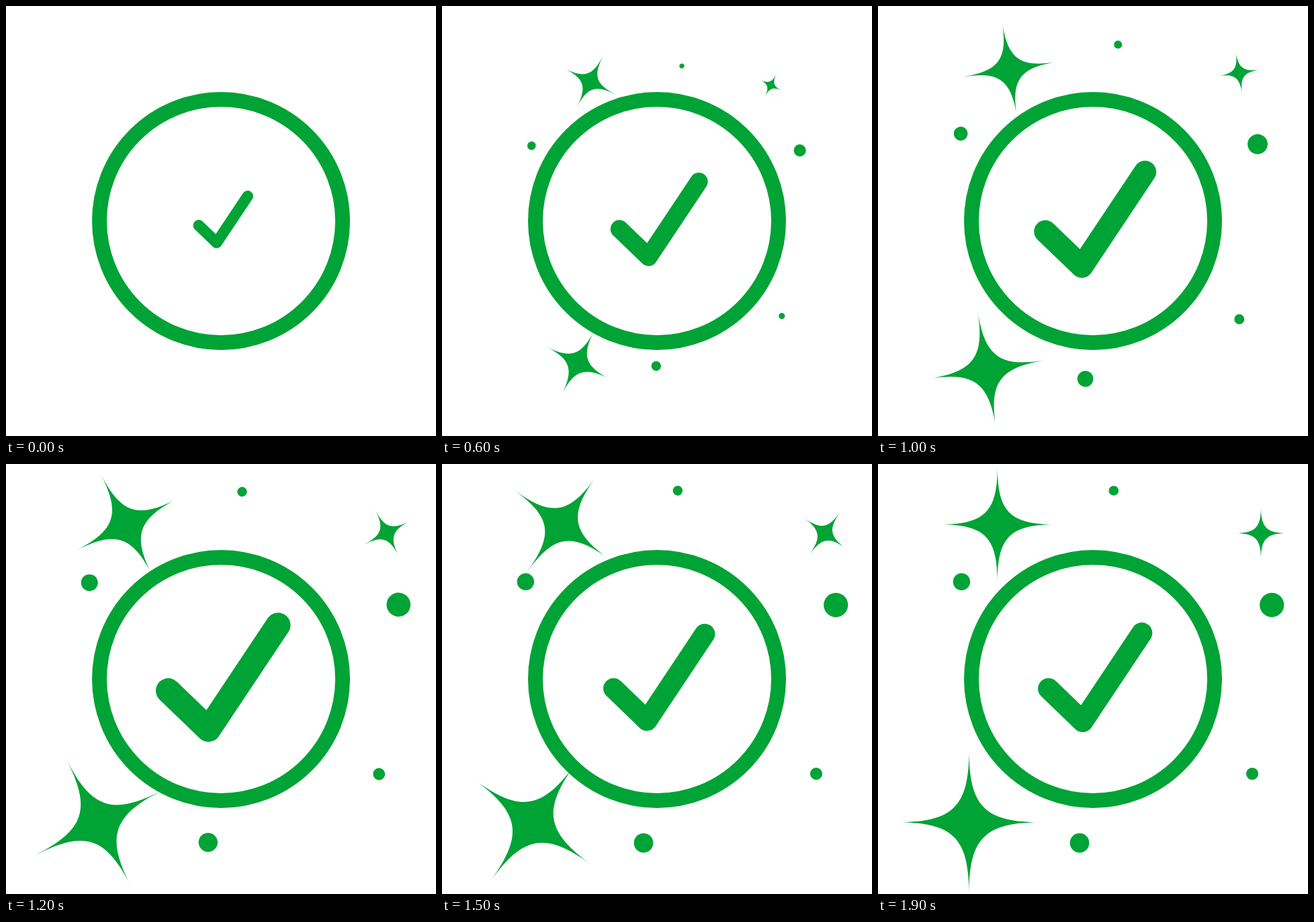
Write an HTML page with a canvas that moves like this. It is 640 px wide and 640 px high and loops after 2200 ms.

```html
<!DOCTYPE html>
<html lang="en">
<head>
<meta charset="utf-8">
<title>Success check</title>
<style>
  html, body { margin: 0; width: 100%; height: 100%; overflow: hidden; background: #fff; }
  canvas { display: block; }
</style>
</head>
<body>
<canvas id="stage" width="640" height="640"></canvas>
<script>
const ctx = document.getElementById('stage').getContext('2d');
const LOOP = 2200, STEP = 100, LAST = 1900, PEAK = 1200;
const GREEN = '#00a335';
const CENTER = 320, RING = 181;

// Particles leave the ring at an angle (degrees) and bow sideways on the way to x, y.
const PARTICLES = [
  { shape: star, size: 107, angle: 110, bend: 0.196, x: 135.5, y: 533.3 },
  { shape: star, size: 86, angle: -112, bend: -0.133, x: 177.8, y: 90 },
  { shape: star, size: 39, angle: -55, bend: 0.169, x: 570, y: 103 },
  { shape: dot, size: 7.3, angle: -82, bend: -0.12, x: 350.8, y: 39.7 },
  { shape: dot, size: 18.1, angle: -24, bend: 0.17, x: 586.2, y: 209.8 },
  { shape: dot, size: 12.7, angle: -150, bend: 0.233, x: 124.4, y: 175.3 },
  { shape: dot, size: 14.4, angle: 87, bend: 0.087, x: 300, y: 564 },
  { shape: dot, size: 9.1, angle: 41, bend: -0.143, x: 557, y: 461 }
];

// Sideways drift: grows steadily until two thirds of the way, then falls back.
function bow(p) {
  return p < 2 / 3 ? 1.5 * p : 1 - (3 * p - 2) ** 1.3;
}

function flight({ angle, bend, x, y }, p) {
  const a = angle * Math.PI / 180;
  const x0 = CENTER + (RING + 3) * Math.cos(a), y0 = CENTER + (RING + 3) * Math.sin(a);
  const dx = x - x0, dy = y - y0, side = bend * bow(p);
  return [x0 + dx * p + dy * side, y0 + dy * p - dx * side];
}

// Steady growth past full size, then a damped swing back to it.
function checkScale(t) {
  const start = 0.525, overshoot = 0.178;
  if (t < PEAK) return start + (1 + overshoot - start) * t / PEAK;
  const u = t - PEAK, decay = (1 - u / (LAST - PEAK)) ** 1.6;
  return 1 + overshoot * decay * Math.cos(Math.PI * u / 500);
}

function place([x, y], scale, angle, paint) {
  ctx.save();
  ctx.translate(x, y);
  ctx.rotate(angle);
  ctx.scale(scale, scale);
  ctx.beginPath();
  paint();
  ctx.restore();
}

function star() {
  const pinch = 0.22;
  ctx.moveTo(0, -1);
  for (let i = 0; i < 4; i++) {
    ctx.bezierCurveTo(0, -pinch, pinch, 0, 1, 0);
    ctx.rotate(Math.PI / 2);
  }
  ctx.fill();
}

function dot() {
  ctx.arc(0, 0, 1, 0, 2 * Math.PI);
  ctx.fill();
}

function ring() {
  ctx.lineWidth = 22;
  ctx.arc(0, 0, RING, 0, 2 * Math.PI);
  ctx.stroke();
}

function check() {
  ctx.lineWidth = 31.4;
  ctx.moveTo(-69.5, 16.6);
  ctx.lineTo(-18.6, 65.6);
  ctx.lineTo(69.3, -66.2);
  ctx.stroke();
}

function draw(t) {
  ctx.fillStyle = '#fff';
  ctx.fillRect(0, 0, 640, 640);
  ctx.fillStyle = ctx.strokeStyle = GREEN;
  ctx.lineCap = ctx.lineJoin = 'round';

  const growth = Math.min(1, (t + 20) / 1240);
  const spin = (LAST - t) / 2000 * Math.PI;
  for (const particle of PARTICLES) {
    place(flight(particle, growth), particle.size * growth, spin, particle.shape);
  }
  place([CENTER, CENTER], 1, 0, ring);
  place([323.3, 317.8], checkScale(t), 0, check);
}

const start = performance.now();
function tick() {
  const t = (performance.now() - start) % LOOP;
  draw(Math.min(LAST, Math.floor(t / STEP) * STEP));
  requestAnimationFrame(tick);
}
tick();
</script>
</body>
</html>
```
